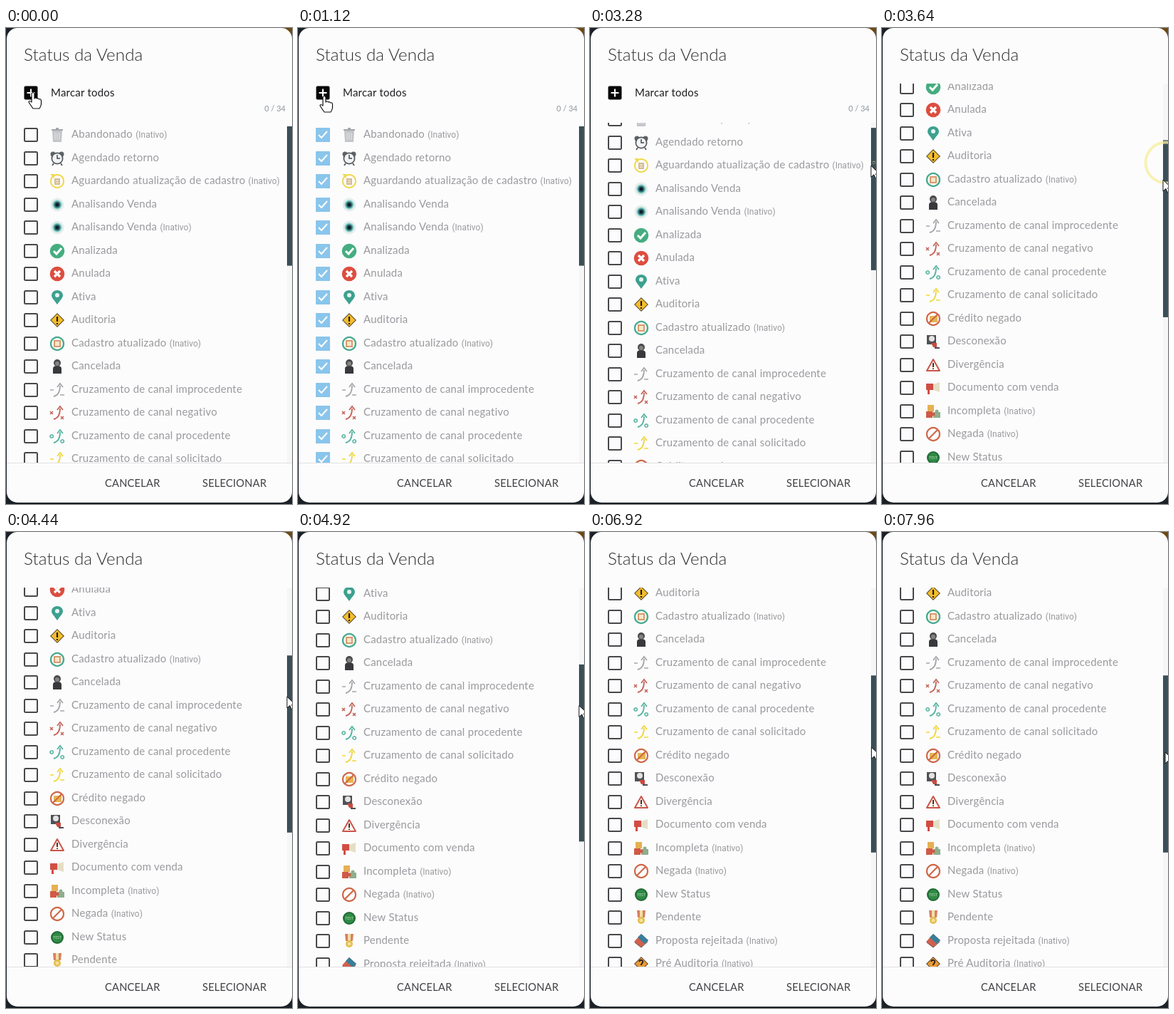
Recreate the animation shown at these times as an HTML page. Size 402 by 668 pixels, loop 8000 ms.

```html
<!DOCTYPE html>
<html lang="pt">
<head>
<meta charset="utf-8">
<style>
html, body { margin: 0; width: 100%; height: 100%; overflow: hidden; background: #1b2126; }
#stage { display: block; font: 15px Lato, sans-serif; letter-spacing: .2px; word-spacing: .2px; }
.row text { fill: #9a9a9e; }
.small { font: 12px Roboto, sans-serif; letter-spacing: 0; }
.tight { letter-spacing: 0; word-spacing: 0; }
.line { fill: none; stroke-width: 2; }
.actions { fill: #424245; font-size: 14.7px; }
</style>
</head>
<body>
<svg id="stage" width="402" height="668" viewBox="0 0 402 668">
  <path d="M372 0H402V24Z" fill="#6b4a12"/>
  <rect x="1" width="401" height="666" rx="15" fill="#fcfcfd"/>
  <text class="tight" x="25" y="46" font-size="24.3" font-weight="300" fill="#2c2c2e">Status da Venda</text>
  <rect x="25.500" y="81.500" width="19" height="19" rx="2" fill="#060607"/>
  <path d="M29.500 91H40.500M35 85.500V96.500" stroke="#fff" stroke-width="2"/>
  <text x="63" y="96" fill="#1e1e20">Marcar todos</text>
  <text class="tight" x="393" y="117" font-size="11" text-anchor="end" fill="#8f979d">0 / 34</text>
  <svg id="list" width="402">
    <rect x="1" width="401" height="600" fill="#fcfcfd"/>
    <rect x="395" width="7" height="600" fill="#f6f6f7"/>
    <g id="rows"></g>
    <rect id="thumb" x="395" width="7" fill="#3b4f58"/>
  </svg>
  <path d="M1 610.5H402" stroke="#e1e1e3"/>
  <g class="actions"><text x="139" y="644">CANCELAR</text><text x="276" y="644">SELECIONAR</text></g>
  <circle id="ring" fill="none" stroke="#f7ef9f" stroke-width="4"/>
  <g id="cursor" stroke="#111113" stroke-linejoin="round" fill="#fff">
    <path id="hand" stroke-width="1.2" d="M-2 2Q0-1 2 2V9Q4 7 5.500 9Q7 8 8.500 10Q11 9 11.500 12V17Q11 20 9 23H0Q-3 19-6 14Q-6 11-2 14Z"/>
    <path id="arrow" d="M0 0V16L4 12.500L6.500 18L9 17L6.500 11.500H12Z"/>
  </g>
</svg>
<script>
const $ = id => document.getElementById(id);
const PITCH = 32.5, CONTENT = 1139, HEADER = 60;

// Icon helpers, all centred on 0,0
const disc = (r, fill, x = 0, y = 0) => `<circle cx="${x}" cy="${y}" r="${r}" fill="${fill}"/>`;
const shape = (d, fill) => `<path d="${d}" fill="${fill}"/>`;
const line = (d, color, w = 2) => `<path class="line" d="${d}" stroke="${color}" style="stroke-width:${w}"/>`;
const loop = (r, color, w = 2) => line(`M${-r} 0A${r} ${r} 0 1 1 ${-r} .01Z`, color, w);
const diamond = (fill, mark) => shape('M0-10L10 0L0 10L-10 0Z', '#5b4a2c') + shape('M0-8.500L8.500 0L0 8.500L-8.500 0Z', fill) + mark;
const bang = line('M0-5V2M0 4V6', '#211c18', 2.2);
const crossing = (color, mark) => line('M-5 9Q4 7 4-6M0-4L4-9L8-4', color, 1.8) + line(mark, color, 1.6);
const dashes = 'M-10 0H-5M4 7H10';
const crosses = 'M-10-2L-6 2M-6-2L-10 2M5 5L9 9M9 5L5 9';
const rings = 'M-10 0a2.200 2.200 0 1 1 0 .01ZM5 7a2.200 2.200 0 1 1 0 .01Z';
const noEntry = loop(9, '#cf6848', 2.2) + line('M-6 6L6-6', '#cf6848', 2.2);
const eye = disc(9.5, '#e3eeec') + disc(6.5, '#7fc8bd') + disc(4.5, '#2a6d78') + disc(2.5, '#131c24');

const items = [
  ['Abandonado', 1, shape('M-7-6H7L6 10H-6Z', '#c3c5c8') + line('M-8-7H8M-2-9H2', '#a4a6aa') + line('M-3-3V7M0-3V7M3-3V7', '#e6e7e9', 1)],
  ['Agendado retorno', 0, disc(3.5, '#5f6468', -6, -6) + disc(3.5, '#5f6468', 6, -6) + line('M-5 7L-7 10M5 7L7 10', '#5f6468') + disc(8.5, '#53585d') + disc(6.8, '#f1f2f3') + line('M0-5V0H4', '#45484c', 1.5)],
  ['Aguardando atualização de cadastro', 1, loop(9, '#f0d84c') + shape('M-10-10H-4V-4Z', '#f0d84c') + shape('M-4-4H4V5H-4Z', '#d5bd98') + line('M-2-1H2M-2 2H2', '#fff8e8', 1)],
  ['Analisando Venda', 0, eye],
  ['Analisando Venda', 1, eye],
  ['Analizada', 0, disc(10.3, '#46ad80') + line('M-5 0L-1 4L6-4', '#fff', 3)],
  ['Anulada', 0, disc(10.3, '#dc4e40') + line('M-4-4L4 4M4-4L-4 4', '#fff', 3.2)],
  ['Ativa', 0, shape('M0 10C-4 4-8 1-8-3A8 7 0 0 1 8-3C8 1 4 4 0 10Z', '#3da18f') + disc(3, '#e9f3f0', 0, -3)],
  ['Auditoria', 0, diamond('#f3bd2c', bang)],
  ['Cadastro atualizado', 1, loop(9, '#48ab8e', 2.4) + shape('M-5-5H5V5H-5Z', '#d99a6c') + shape('M-3-3H3V3H-3Z', '#f6e6cc')],
  ['Cancelada', 0, shape('M-6 10V3Q-6-1 0-1T6 3V10Z', '#37393d') + disc(5, '#484a4e', 0, -5) + disc(3, '#85827f', 0, -4)],
  ['Cruzamento de canal improcedente', 0, crossing('#a5a6aa', dashes)],
  ['Cruzamento de canal negativo', 0, crossing('#c4645a', crosses)],
  ['Cruzamento de canal procedente', 0, crossing('#55b39e', rings)],
  ['Cruzamento de canal solicitado', 0, crossing('#efd63c', dashes)],
  ['Crédito negado', 0, shape('M-5-4H6V5H-5Z', '#e6b650') + noEntry],
  ['Desconexão', 0, shape('M-9-9H4V4H-9Z', '#505154') + disc(4, '#e3e3e4', -2, -4) + shape('M-3 2H5V8H0Z', '#c84a40') + line('M2 9H9', '#4b4c4f')],
  ['Divergência', 0, `<path d="M0-8L9 8H-9Z" fill="#fffaf4" stroke="#c8554a" stroke-width="2" stroke-linejoin="round"/>` + line('M0-3V3M0 4.500V6', '#4a2c28')],
  ['Documento com venda', 0, shape('M-10-6H0V3H-5V9H-8V3H-10Z', '#d14d44') + shape('M0-5L9-8V6L0 3Z', '#e4dfc4')],
  ['Incompleta', 1, shape('M-8-9H1V0H-8Z', '#e6b054') + shape('M-10 0H-1V9H-10Z', '#cf5a45') + shape('M0 1H10V9H0Z', '#8fae8c') + disc(2.5, '#cf5a45', 0, 4) + disc(2.5, '#8fae8c', 5, 0)],
  ['Negada', 1, noEntry],
  ['New Status', 0, disc(9, '#216b35') + disc(7, '#2f8a45') + '<text y="2" text-anchor="middle" style="font-size:5px;letter-spacing:0;fill:#b7dfb8">TEST</text>'],
  ['Pendente', 0, shape('M-6-10H-2V0H-5ZM2-10H6L5 0H2Z', '#d88060') + shape('M-2-10H2V0H-2Z', '#f0dfa8') + disc(5, '#e4bd48', 0, 4) + disc(2.5, '#f3df98', 0, 4)],
  ['Proposta rejeitada', 1, shape('M0-10L10-1L0 9L-10 1Z', '#d2604c') + shape('M0-10L10-1L5 4L-5-5Z', '#367f9a') + line('M-9 2L0 9L9 1', '#61443c', 1)],
  ['Pré Auditoria', 1, diamond('#e99a38', line('M-3-3Q-2-6 1-5T0 1V2M0 4V6', '#2a1d16', 1.8))],
];

$('rows').innerHTML = items.map(([name, inactive, icon], i) => `
  <g class="row" transform="translate(0 ${Math.round(12 + PITCH * i)})">
    <rect x="26" y="-9" width="18" height="18" rx="1.5" fill="none" stroke="#48484b" stroke-width="2"/>
    <g class="check"><rect x="25" y="-10" width="20" height="20" rx="2" fill="#8ac5ec"/>${line('M29 0L33 4L41-5', '#fff')}</g>
    <g transform="translate(72 0)">${icon}</g>
    <text x="92" y="4">${name}${inactive ? ' <tspan class="small">(Inativo)</tspan>' : ''}</text>
  </g>`).join('');
const checks = document.querySelectorAll('.check');

const pointer = [
  [0, 38, 90], [360, 37, 95], [1680, 37, 95], [1800, 399, 190], [2960, 399, 190], [3240, 395, 191],
  [3640, 395, 213], [3720, 395, 216], [3880, 395, 216], [4440, 395, 231], [5520, 395, 259],
  [5920, 395, 282], [6360, 395, 299], [7240, 396, 304], [7360, 396, 316], [7560, 396, 316], [7680, 398, 309],
];
const scroll = [[3240, 0], [3640, 170], [3720, 176], [3880, 176], [4440, 204], [5520, 264]];
const clicks = [[80, 40, 98], [1240, 40, 98], [3280, 399, 189], [5480, 394, 253]];

const ramp = (t, from, length) => Math.min(1, Math.max(0, (t - from) / length));

function track(keys, t) {
  const next = keys.findIndex(k => k[0] > t);
  if (next === 0) return keys[0].slice(1);
  if (next < 0) return keys[keys.length - 1].slice(1);
  const a = keys[next - 1], b = keys[next], p = (t - a[0]) / (b[0] - a[0]);
  return a.slice(1).map((v, i) => v + (b[i + 1] - v) * p);
}

function set(id, attributes) {
  for (const name in attributes) $(id).setAttribute(name, attributes[name]);
}

function draw(t) {
  const checked = ramp(t, 160, 150) - ramp(t, 1360, 150);
  checks.forEach(c => c.setAttribute('opacity', checked));

  const offset = Math.round(track(scroll, t)[0]);
  const p = ramp(t, 3240, 240), shift = Math.round(HEADER * p * p * (3 - 2 * p));
  const height = 472 + shift;
  set('list', { y: 138 - shift, height });
  set('rows', { transform: `translate(0 ${-offset})` });
  set('thumb', { y: offset * height / CONTENT, height: height * height / CONTENT });

  const click = clicks.find(([start]) => t >= start && t < start + 800);
  set('ring', { opacity: 0 });
  if (click) {
    const age = (t - click[0]) / 800;
    set('ring', { cx: click[1], cy: click[2], r: 34 * (1 - (1 - age) ** 3), opacity: Math.min(1, 1.4 * (1 - age)) });
  }

  const [x, y] = track(pointer, t), pointing = t < 1720;
  set('cursor', { transform: `translate(${x} ${y})` });
  set('hand', { opacity: +pointing });
  set('arrow', { opacity: +!pointing });
}

const start = performance.now();
(function frame() {
  draw((performance.now() - start) % 8000);
  requestAnimationFrame(frame);
})();
</script>
</body>
</html>
```
